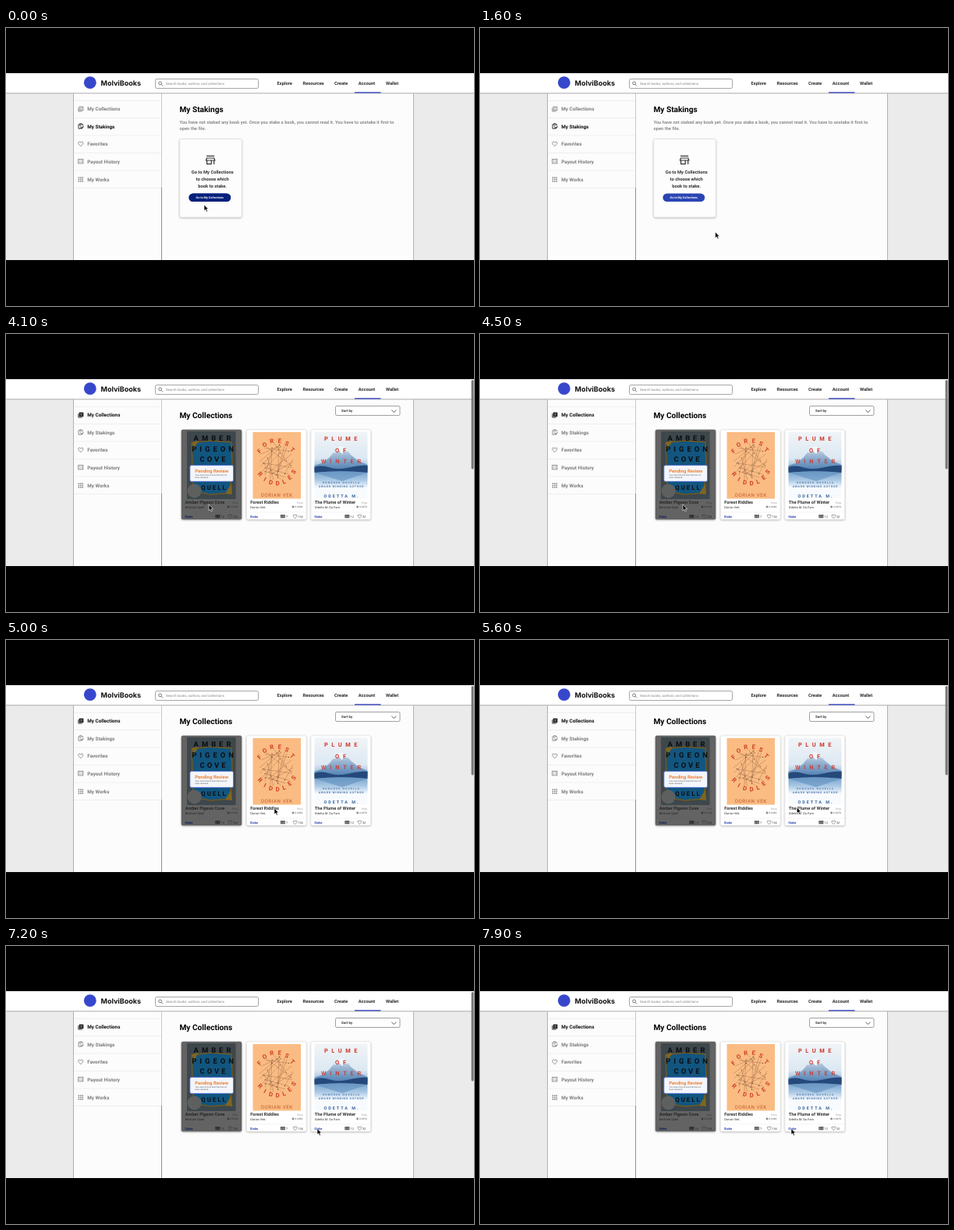
An HTML page that plays this animation: 600 by 357 pixels, repeating every 8 s.

```html
<!DOCTYPE html>
<html lang="en">
<head>
<meta charset="utf-8">
<title>Book staking</title>
<style>
html, body { margin: 0; width: 100%; height: 100%; overflow: hidden; background: #000; }
svg { display: block; width: 600px; height: 357px; }
text { font-family: Roboto, sans-serif; font-weight: 700; text-rendering: geometricPrecision; white-space: pre; }
.reg { font-weight: 400; }
.mid { text-anchor: middle; }
.end { text-anchor: end; }
.item { color: #7c7c7c; }
.item.on { color: #0c0c0c; }
.item text { font-size: 6.3px; fill: currentColor; }
.icon { fill: none; stroke: currentColor; stroke-width: .8; }
.icon .solid { fill: currentColor; stroke: none; }
.item.on .fillable { fill: currentColor; }
.item.on .lines { stroke: #fff; }
</style>
</head>
<body>
<svg viewBox="0 0 600 357" xmlns="http://www.w3.org/2000/svg">
  <defs>
    <linearGradient id="fall" x2="0" y2="1">
      <stop stop-color="#b8b8b8"/><stop offset="1" stop-color="#b8b8b8" stop-opacity="0"/>
    </linearGradient>
    <linearGradient id="lake" x2="0" y2="1">
      <stop stop-color="#f1f4f7"/><stop offset=".4" stop-color="#dce8f2"/>
      <stop offset=".6" stop-color="#7ea6cd"/><stop offset=".72" stop-color="#a9c8e4"/>
      <stop offset=".84" stop-color="#f8fbfd"/>
    </linearGradient>
    <linearGradient id="peak" x2="0" y2="1">
      <stop stop-color="#dde6f0"/><stop offset=".4" stop-color="#9bb6d3"/><stop offset="1" stop-color="#4f7fb3"/>
    </linearGradient>
    <filter id="shade" x="-10%" y="-10%" width="120%" height="120%">
      <feDropShadow dx="0" dy=".8" stdDeviation="1" flood-opacity=".35"/>
    </filter>
    <path id="heart" d="M0 2.9C-4.6-.4-3-3.2-1.4-2.7-.6-2.5-.2-2 0-1.5.2-2 .6-2.5 1.4-2.7 3-3.2 4.6-.4 0 2.9Z"/>
  </defs>

  <rect width="600" height="357"/>
  <rect y="58" width="600" height="240" fill="#ebebeb"/>
  <rect x="86.5" y="83" width="436" height="215" fill="#fcfcfc"/>
  <path d="M86.5 84V298M522.5 84V298" stroke="#a0a0a0" stroke-width=".8"/>
  <path d="M199.5 84V205" stroke="#b4b4b4" stroke-width=".7"/>
  <path d="M199.5 205V298" stroke="#777" stroke-width=".8"/>
  <path d="M87 93.3H199M87 115.5H199M87 138H199M87 160.5H199M87 183H199M87 205.5H199" stroke="#ebebeb" stroke-width=".8"/>
  <rect y="83" width="600" height="2.4" fill="url(#fall)"/>
  <rect y="58" width="600" height="25" fill="#fff"/>

  <circle cx="107.8" cy="70.2" r="7.9" fill="#3747cc"/>
  <text x="121.5" y="73.8" font-size="9" fill="#111" style="font-family:Inter,sans-serif;font-weight:700">MolviBooks</text>
  <rect x="191.5" y="65.5" width="132" height="12" rx="1.8" fill="#fff" stroke="#808080" stroke-width=".7"/>
  <g fill="none" stroke="#444" stroke-width=".7"><circle cx="197.6" cy="70.9" r="1.9"/><path d="M199 72.3L201.2 74.5"/></g>
  <text class="reg" x="205" y="73.1" font-size="4.4" fill="#858585">Search books, authors, and collections</text>
  <g id="menu" font-size="5.75" fill="#2b2b2b"></g>
  <rect x="447" y="82.2" width="33.5" height="1.3" fill="#3040c4"/>
  <g id="side"></g>

  <g id="stakings">
    <text x="222.5" y="107.9" font-size="10.1">My Stakings</text>
    <g font-size="5.74" fill="#8c8c8c">
      <text x="222.5" y="122.9">You have not staked any book yet. Once you stake a book, you cannot read it. You have to unstake it first to</text>
      <text x="222.5" y="131">open the file.</text>
    </g>
    <rect x="222.7" y="142.7" width="79.5" height="100.2" rx="1.8" fill="#fdfdfd" stroke="#d4d4d4" stroke-width=".5" filter="url(#shade)"/>
    <g fill="none" stroke="#333" stroke-width="1.2">
      <path d="M257 164.4H267.2"/>
      <path d="M257.4 167H266.8L267.8 170H256.4ZM257.6 170V174.6H263.2V170M266.7 170V175"/>
    </g>
    <g class="mid" font-size="5.8" fill="#333">
      <text x="264.7" y="187.3">Go to My Collections</text>
      <text x="264.7" y="195.9">to choose which</text>
      <text x="264.7" y="204.5">book to stake.</text>
    </g>
    <rect x="234.4" y="212.4" width="53.8" height="10.6" rx="5.3" fill="#2b45b4"/>
    <rect id="hover" x="234.4" y="212.4" width="53.8" height="10.6" rx="5.3" fill="#04207c"/>
    <text class="mid" x="261.3" y="219" font-size="3.8" fill="#fff">Go to My Collections</text>
  </g>

  <g id="collections">
    <text x="222.5" y="107.9" font-size="10.15">My Collections</text>
    <rect x="422.5" y="92.5" width="82.5" height="12" rx="1.6" fill="#fff" stroke="#777" stroke-width=".7"/>
    <text x="430" y="100.2" font-size="4.4" fill="#333">Sort by</text>
    <path d="M494.3 97.6L497.3 100.6L500.3 97.6" fill="none" stroke="#333" stroke-width=".8"/>
    <g id="cards"></g>

    <g id="cover1">
      <rect x="232" y="125" width="62.5" height="87" fill="#3d474c"/>
      <path d="M238 140L262 137L289 139L290 168L287 204L262 206L240 202Z" fill="#12557f" stroke="#6f5720" stroke-width="1.6"/>
      <path d="M238 139L247 137L241 147ZM281 205L290 206L289 192Z" fill="#80651f"/>
      <g class="mid" fill="#0b0e10" font-size="9.4">
        <text x="266.5" y="136.7" letter-spacing="4">AMBER</text>
        <text x="267" y="151.4" letter-spacing="4">PIGEON</text>
        <text x="266.5" y="164.3" letter-spacing="3">COVE</text>
        <text x="267" y="199.6" letter-spacing="2" font-size="7.8">QUELL</text>
      </g>
      <circle cx="241.6" cy="201.4" r="9" fill="#5e605f"/>
      <rect x="235.8" y="168.6" width="55.8" height="20.8" rx="2" fill="#f4f6fc" stroke="#4468cc" stroke-width=".9"/>
      <text x="242.2" y="178.4" font-size="6" fill="#f28230">Pending Review</text>
      <g font-size="2.6" fill="#555">
        <text class="reg" x="242.6" y="182.2">You cannot list an item that has not</text>
        <text class="reg" x="242.6" y="185.4">been reviewed.</text>
      </g>
    </g>

    <g id="cover2">
      <rect x="316.5" y="126" width="61.5" height="85.5" fill="#fabc83"/>
      <path id="web" fill="none" stroke="#6b4028" stroke-width=".28"/>
      <path id="knots" stroke="#4a2f22" stroke-width="1.1" stroke-linecap="round"/>
      <g id="ring" class="mid" font-size="7.8" fill="#cf4026"></g>
      <text class="reg mid" x="347.3" y="209.4" font-size="6.2" letter-spacing=".55" fill="#c0592c">DORIAN VEK</text>
    </g>

    <g id="cover3">
      <rect x="395.5" y="125.5" width="68" height="86" fill="url(#lake)"/>
      <path d="M395.5 169L407 165L415 158L424 147L429 144L434 145.5L442 155L452 163L463.5 168V175H395.5Z" fill="url(#peak)"/>
      <path d="M424 147L429 144L434 145.5L439 151L434 150L431 154L427 150L420 153Z" fill="#f3f7fb"/>
      <path d="M395.5 171Q405 168 415 171.5T440 171.5T463.5 169V178Q430 174.5 395.5 178Z" fill="#24497a"/>
      <path d="M395.5 178Q430 174.5 463.5 178L431 189Z" fill="#5f90c0" opacity=".6"/>
      <g class="mid" fill="#cd3529">
        <text x="431.5" y="136.6" font-size="7.4" letter-spacing="4.6">PLUME</text>
        <text x="431.5" y="151.8" font-size="7.4" letter-spacing="5">OF</text>
        <text x="432" y="166.2" font-size="7.4" letter-spacing="4.8" opacity=".85">WINTER</text>
      </g>
      <g class="mid" fill="#4f78ae">
        <text x="430" y="192.4" font-size="3.3" letter-spacing="1.2">HONORED NOVELLA</text>
        <text x="430" y="197" font-size="3.5" letter-spacing=".8">AWARD WINNING AUTHOR</text>
        <text x="430.5" y="210" font-size="5.4" letter-spacing="2" fill="#35609c">ODETTA M.</text>
      </g>
    </g>
    <rect id="bar" x="596.6" y="59" width="3" height="114.5" rx="1.5" fill="#757575"/>
  </g>

  <g id="cursor">
    <path id="arrow" d="M0 0V7.7L1.8 6.1L3 9L4.4 8.4L3.2 5.6H5.5Z" stroke="#fff" stroke-width=".6"/>
    <path id="hand" d="M-.9 .8C-.9-.3 .7-.3 .7 .8V3.4C1.2 2.8 2 3 2.1 3.6 2.6 3.1 3.2 3.4 3.3 4 3.8 3.6 4.4 4 4.3 4.7L4 7.3 3.2 9H-.3L-2.4 6.1C-3 5.2-2 4.5-1.4 5.3L-.9 5.9Z" fill="#fff" stroke="#000" stroke-width=".75"/>
  </g>
</svg>
<script>
const $ = id => document.getElementById(id);
const fill = (id, html) => { $(id).innerHTML = html; };
const txt = (x, y, s, attrs = '') => `<text x="${x}" y="${y}" ${attrs}>${s}</text>`;

fill('menu', [['Explore', 347.5], ['Resources', 380.5], ['Create', 421], ['Account', 451.7], ['Wallet', 487]]
  .map(([s, x]) => txt(x, 72.8, s)).join(''));

// Sidebar icons are centred on 0,0
const dots = [-2.4, 0, 2.4].flatMap(y => [-2.4, 0, 2.4].map(x =>
  `<rect class="solid" x="${x - .75}" y="${y - .75}" width="1.5" height="1.5"/>`)).join('');
const items = [
  ['My Collections', 104.1, '<path d="M-3-1.8V3H1.8"/><rect class="fillable" x="-1.7" y="-3" width="4.8" height="4.7"/><path class="lines" d="M-.6-1.5H2M-.6 .1H2" stroke-width=".6"/>'],
  ['My Stakings', 126.2, '<path d="M2.8-.8V-2.4H-2.8V3H.2M-1.2-2.4V-3.3H1.2V-2.4M-1.4-.4H1"/><path d="M-.2 1.3L1.2 2.7L3.6 .2" stroke-width="1.1"/>'],
  ['Favorites', 148.8, '<use href="#heart"/>'],
  ['Payout History', 171.2, '<rect x="-3.1" y="-2.7" width="6.2" height="5.4"/><path d="M-2-1H-.4M-2 .8H-.4M.7-.9L1.3-.3L2.3-1.4M.7 1H2.2" stroke-width=".7"/>'],
  ['My Works', 194.5, dots]
];
fill('side', items.map(([s, y, icon]) =>
  `<g class="item"><g class="icon" transform="translate(95.8 ${y})">${icon}</g>${txt(104.3, y + 2.3, s)}</g>`).join(''));
const rows = document.querySelectorAll('.item');

function card(x, w, title, author, price, reads, likes, dim) {
  const ink = dim ? '#272727' : '#333', soft = dim ? '#3b3b3b' : '#8a8a8a', right = x + w - 4.6;
  const icons = x + 46.5;
  return `<rect x="${x}" y="123" width="${w}" height="115" rx="1.8" fill="${dim ? '#646464' : '#fff'}" stroke="${dim ? '#5a5a5a' : '#ddd'}" stroke-width=".5" filter="url(#shade)"/>
    ${txt(x + 4.8, 218, title, `font-size="5.7" fill="${ink}"`)}
    ${txt(x + 4.8, 223.7, author, `class="reg" font-size="4" fill="${ink}"`)}
    ${txt(right, 218, 'Price', `class="reg end" font-size="3.2" fill="${soft}"`)}
    ${txt(right, 223.4, price, `class="end" font-size="3.2" fill="${soft}"`)}
    <circle cx="${right - 12.4}" cy="222" r="1.4" fill="${soft}"/>
    <path d="M${x} 229H${x + w}" stroke="${dim ? '#5f5f5f' : '#ececec'}" stroke-width=".6"/>
    ${txt(x + 4.3, 235.8, 'Stake', `font-size="4" fill="${dim ? '#101d5e' : '#2b45b4'}"`)}
    <g fill="none" stroke="${ink}" stroke-width=".6">
      <rect x="${icons - 2.7}" y="232.4" width="5.2" height="3.5" fill="${soft}"/>
      <path d="M${icons - .1} 232.4V236"/>
      <use href="#heart" transform="translate(${icons + 15.8} 234.2) scale(.8)"/>
    </g>
    ${txt(icons + 4, 235.5, reads, `class="reg" font-size="3.8" fill="${ink}"`)}
    ${txt(icons + 19.4, 235.5, likes, `class="reg" font-size="3.8" fill="${ink}"`)}`;
}
fill('cards',
  card(225, 77, 'Amber Pigeon Cove', 'Bertram Quell', '0.0143', 10, 324, true) +
  card(308.4, 76.6, 'Forest Riddles', 'Dorian Vek', '0.0086', 7, 134) +
  card(391, 76.6, 'The Plume of Winter', 'Odetta M. Du Farn', '0.0070', 12, 32));

// Letters around an ellipse, joined by a web of thin lines with knots
const spot = (deg, k = 1) => {
  const a = deg * Math.PI / 180;
  return [346.5 + 25 * k * Math.cos(a), 164 + 27.5 * k * Math.sin(a)];
};
const around = (word, from, to, turn) => [...word].map((c, i) => {
  const deg = from + (to - from) * i / (word.length - 1), [x, y] = spot(deg);
  return `<text transform="translate(${x} ${y}) rotate(${(deg + turn) * .8})" y="2.8">${c}</text>`;
}).join('');
fill('ring', around('FOREST', -150, -34, 90) + around('RIDDLES', 145, 28, -90));

let seed = 11;
const rnd = () => (seed = seed * 16807 % 2147483647) / 2147483647;
let web = '', knots = '';
for (let i = 0; i < 20; i++) {
  const a = i * 18 + rnd() * 12, end = spot(a + 60 + rnd() * 110, .45 + rnd() * .4);
  web += `M${spot(a, .86)}L${end}`;
  knots += `M${end}h.01`;
}
$('web').setAttribute('d', web);
$('knots').setAttribute('d', knots);

const LOOP = 8000, STEP = 100, CLICK = 3600;
const path = [
  [0, 254, 227], [900, 301.6, 262], [1600, 301.6, 262], [2500, 260.4, 219], [4500, 260, 219],
  [5400, 404, 214], [5600, 406.2, 215], [6200, 397.6, 241.3], [6700, 397.8, 241], [7100, 399, 234.5], [LOOP, 399, 234.5]
];
const glow = [[0, 1], [100, 1], [400, 0], [2200, 0], [2500, 1], [LOOP, 1]];
const barFade = [[0, 1], [7200, 1], [7500, 0], [LOOP, 0]];

function at(keys, t) {
  const i = keys.findIndex(k => k[0] > t), a = keys[i - 1], b = keys[i];
  const p = (t - a[0]) / (b[0] - a[0]), e = p * p * (3 - 2 * p);
  return a.slice(1).map((v, n) => v + (b[n + 1] - v) * e);
}
const show = (id, on) => { $(id).style.display = on ? '' : 'none'; };

function draw(now) {
  const t = Math.floor(now % LOOP / STEP) * STEP;
  const second = t >= CLICK, pointing = t >= 2300 && !second;
  show('stakings', !second);
  show('collections', second);
  rows[0].classList.toggle('on', second);
  rows[1].classList.toggle('on', !second);
  $('hover').style.opacity = at(glow, t)[0];
  $('bar').style.opacity = at(barFade, t)[0];
  show('arrow', !pointing);
  show('hand', pointing);
  $('cursor').setAttribute('transform', `translate(${at(path, t)})`);
}
const start = performance.now();
function tick() {
  draw(performance.now() - start);
  requestAnimationFrame(tick);
}
tick();
</script>
</body>
</html>
```
